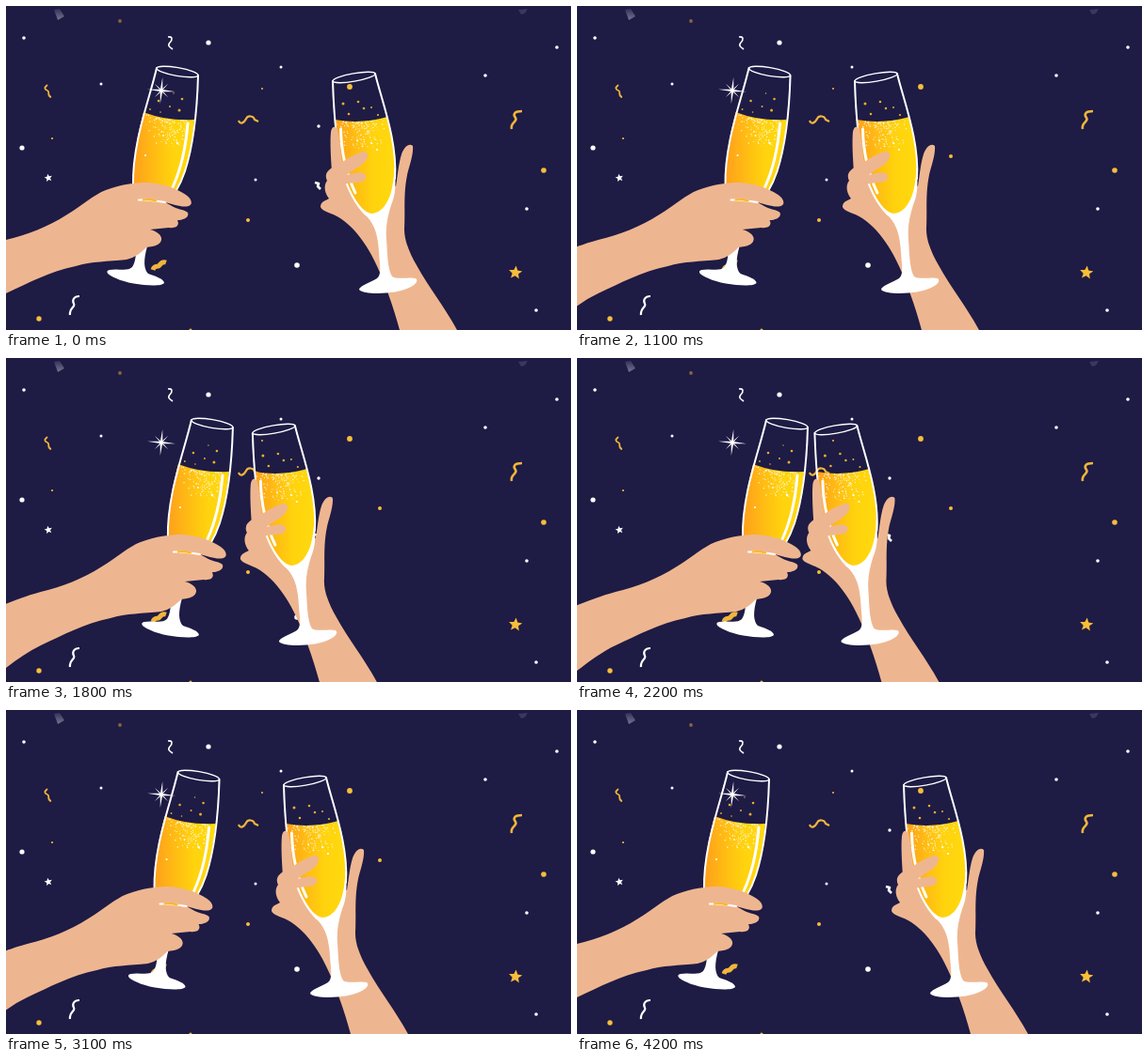
Animation, 600 px wide and 345 px high, one loop 4.3 s. Source, as an HTML page:

```html
<!DOCTYPE html>
<html lang="en">
<head>
<meta charset="utf-8">
<title>Cheers</title>
<style>
  html, body { margin: 0; width: 100%; height: 100%; overflow: hidden; background: #1e1b45; }
  svg { display: block; width: 600px; height: 345px; }
  .skin { fill: #eeb690; }
  .white { fill: #fff; }
  .gold { fill: #f8bd3a; }
  .line { fill: none; stroke: #fff; stroke-width: 2; stroke-linecap: round; stroke-linejoin: round; }
  .thin { stroke-width: 1.4; }
  .shine { stroke-width: 3; }
  .ribbon { fill: none; stroke-width: 2.2; stroke-linejoin: round; }
</style>
</head>
<body>
<svg viewBox="0 0 600 345">
  <defs>
    <linearGradient id="wine">
      <stop offset="0" stop-color="#ff9f1c"/>
      <stop offset=".3" stop-color="#ffb914"/>
      <stop offset=".65" stop-color="#ffd30d"/>
      <stop offset="1" stop-color="#ffd90f"/>
    </linearGradient>
    <linearGradient id="fade" x2="0" y2="1">
      <stop offset="0" stop-color="#34315a"/>
      <stop offset="1" stop-color="#77758f"/>
    </linearGradient>
  </defs>
  <rect width="600" height="345" fill="#1e1b45"/>

  <g id="confetti">
    <path fill="url(#fade)" d="M51 4 57 3 62 11 55 15Z"/>
    <path fill="#3a3760" d="M544 4 554 3 551 8 547 9Z"/>
    <g class="ribbon" stroke="#fff">
      <path d="M172 33C177 32 177 36 174 39S174 44 177 46" stroke-width="1.6"/>
      <path d="M78 309C72 309 70 313 72 317S67 321 68 329"/>
      <path d="M328 188 332 189 331 192 334 195" stroke-width="2.6"/>
    </g>
    <g class="ribbon" stroke="#f0b53c">
      <path d="M44 84C40 87 41 89 44 90S43 96 48 97" stroke-width="1.8"/>
      <path d="M247 122C249 127 253 124 255 120S263 117 264 121L268 123"/>
      <path d="M548 112C540 112 538 115 541 119S535 124 537 131" stroke-width="2.6"/>
      <path d="M156 281C158 275 161 279 163 276S167 272 170 273" stroke-width="5"/>
    </g>
    <g class="white" transform="translate(165 90) rotate(5)">
      <path d="M0-14 1.2-1.2 15 0 1.2 1.2 0 14-1.2 1.2-15 0-1.2-1.2Z"/>
      <path d="M0-14 1-1 14 0 1 1 0 14-1 1-14 0-1-1Z" transform="rotate(40) scale(.72)"/>
    </g>
  </g>

  <g id="left">
    <path fill="url(#wine)" d="M146 113Q172 123 200 121C198 145 193 168 188 180C181 198 173 208 165 214H142C134 198 134 178 137 158C139 142 142 129 146 113Z"/>
    <g class="bubbles"></g>
    <path class="line" d="M160 66C152 101 134 145 135 191M204 74C203 110 200 145 190 176Q186 188 180 198"/>
    <ellipse class="line thin" cx="182" cy="70" rx="22.3" ry="4.4" transform="rotate(10 182 70)"/>
    <path class="line shine" d="M193 125C191 150 187 171 177 193"/>
    <path class="white" d="M138 256H150C146 270 146 280 151 285C160 288 168 291 168 295C165 300 131 297 117 290C107 286 105 282 110 281C119 279 129 283 134 278C138 272 138 264 138 256Z"/>
    <path class="skin" d="M-50 267C-33 260-18 254 0 249C24 243 43 236 65 222C83 211 93 201 106 196C122 190 137 188 150 188C166 189 181 194 191 201C197 205 199 211 194 213C187 215 178 211 169 209L178 214C184 217 190 217 193 220C195 225 188 228 182 228C185 234 180 237 173 236L153 238C161 240 166 245 165 249C164 255 156 256 149 257C143 263 137 268 128 270C108 272 91 272 74 277C45 283 24 295 0 306C-17 314-33 327-50 340Z"/>
    <path class="line" stroke-linecap="butt" d="M141 206.5Q155 206 169 209"/>
    <path fill="none" stroke="#ffb914" stroke-width="2" d="M145 206.4Q153 206 160 207.4"/>
  </g>

  <g id="right">
    <path class="skin" d="M418 345C411 319 402 294 394 277C383 253 370 236 355 226C346 220 336 219 334 214C334 208 340 207 343 205C337 197 338 190 341 186C338 180 341 175 347 172L362 160 414 192C416 180 417 167 420 158C422 151 428 145 432 149C433 158 428 171 426 180C422 200 424 217 423 238C423 250 429 264 436 276C449 300 465 319 479 345Z"/>
    <path class="white" d="M356 172C362 196 373 215 384 225C392 234 395 245 396 262C397 278 399 285 394 290C388 294 375 298 375 302C380 308 415 307 428 300C436 296 438 292 435 290C428 288 416 292 410 288C405 280 405 262 404 248C403 235 405 225 409 212C414 200 414 190 413 172Z"/>
    <path fill="url(#wine)" d="M349 121Q378 126 405 118C411 140 415 165 411 188C408 210 398 221 388 221C374 219 360 188 355 164C352 148 350 135 349 121Z"/>
    <g class="bubbles"></g>
    <path class="line" d="M347 80C348 112 350 144 357 174C362 193 371 211 382 222M392 72C399 101 416 144 413 184"/>
    <ellipse class="line thin" cx="369.5" cy="76" rx="22.8" ry="4.2" transform="rotate(-10 369.5 76)"/>
    <path class="line shine" d="M355.500 131C356 155 361 178 371 199"/>
    <path class="skin" d="M346 176C345 162 344 145 345 134C346 128 350 127 352 132C355 144 355 155 357 166C365 161 374 156 380 155C386 155 385 162 380 167C375 172 367 175 362 180C369 178 377 176 381 179C385 184 379 188 372 188C365 189 360 188 356 193L343 200Z"/>
  </g>
</svg>
<script>
const $ = s => document.querySelector(s);
const dot = (x, y, r, fill) => `<circle cx="${x}" cy="${y}" r="${r}" fill="${fill}"/>`;
const dots = (list, fill) => list.map(([x, y, r]) => dot(x, y, r, fill)).join('');

function star(x, y, size, fill, turn) {
  const points = Array.from({ length: 10 }, (_, i) => {
    const a = i * Math.PI / 5 + turn, r = i % 2 ? size * .45 : size;
    return [x + r * Math.sin(a), y - r * Math.cos(a)];
  });
  return `<polygon points="${points.join(' ')}" fill="${fill}"/>`;
}

$('#confetti').innerHTML +=
  dots([[19, 34, 1.8], [215, 39, 2.6], [101, 83, 1.5], [292, 65, 1.5], [585, 44, 1.8],
    [509, 74, 1.8], [17, 151, 2.6], [265, 185, 1.5], [309, 276, 2.8], [553, 216, 1.8],
    [563, 324, 1.8], [332, 128, 1.7]], '#fff') +
  dots([[272, 88, 1], [365, 86, 2.9], [397, 160, 2], [571, 175, 2.8], [257, 228, 2],
    [49, 141, 1.1], [35, 333, 2.7], [196, 345, 1.6]], '#f8bd3a') +
  dot(121, 16, 1.9, '#85663f') +
  star(45, 183, 4.4, '#fff', -.2) + star(541, 284, 7.5, '#f8bd3a', .1);

// Fizz thins out below the surface, which runs from (x, y) with the given width and slope.
function fizz(x, y, width, slope, seed) {
  const random = () => (seed = seed * 16807 % 2147483647) / 2147483647;
  let out = '';
  for (let i = 0; i < 150; i++) {
    const u = (random() + random()) / 2, depth = random() ** 2 * 28;
    const px = x + width * u, py = y + slope * u + 12 * u * (1 - u) + depth;
    out += dot(px.toFixed(1), py.toFixed(1), (.35 + random() * .45).toFixed(2), '#fff6cf');
  }
  return out;
}

$('#left .bubbles').innerHTML = fizz(147, 115, 50, 6, 7) +
  dots([[148, 159, 1.1], [182, 146, 1.2], [167, 138, .9]], '#fff') +
  dots([[162, 101, 1.3], [187, 99, 1.3], [184, 111, 1.5], [174, 107, 1],
    [153, 110, .9], [178, 93, .7], [164, 113, .8]], '#e5ae2e');
$('#right .bubbles').innerHTML = fizz(351, 122, 52, -3, 23) +
  dots([[394, 153, 1.1], [388, 146, 1.1], [373, 143, .9]], '#fff') +
  dots([[358, 104, 1.5], [374, 102, 1.3], [380, 109, 1.3], [388, 108, 1],
    [364, 115, 1.3], [395, 116, 1.1]], '#e5ae2e');

const left = $('#left'), right = $('#right');
function draw(now) {
  const step = Math.floor(now % 4300 / 100);
  const travel = 21 - Math.abs(21 - step);
  left.setAttribute('transform', `translate(${travel * 2.05})`);
  right.setAttribute('transform', `translate(${travel * -4.73})`);
  requestAnimationFrame(draw);
}
draw(0);
</script>
</body>
</html>
```
